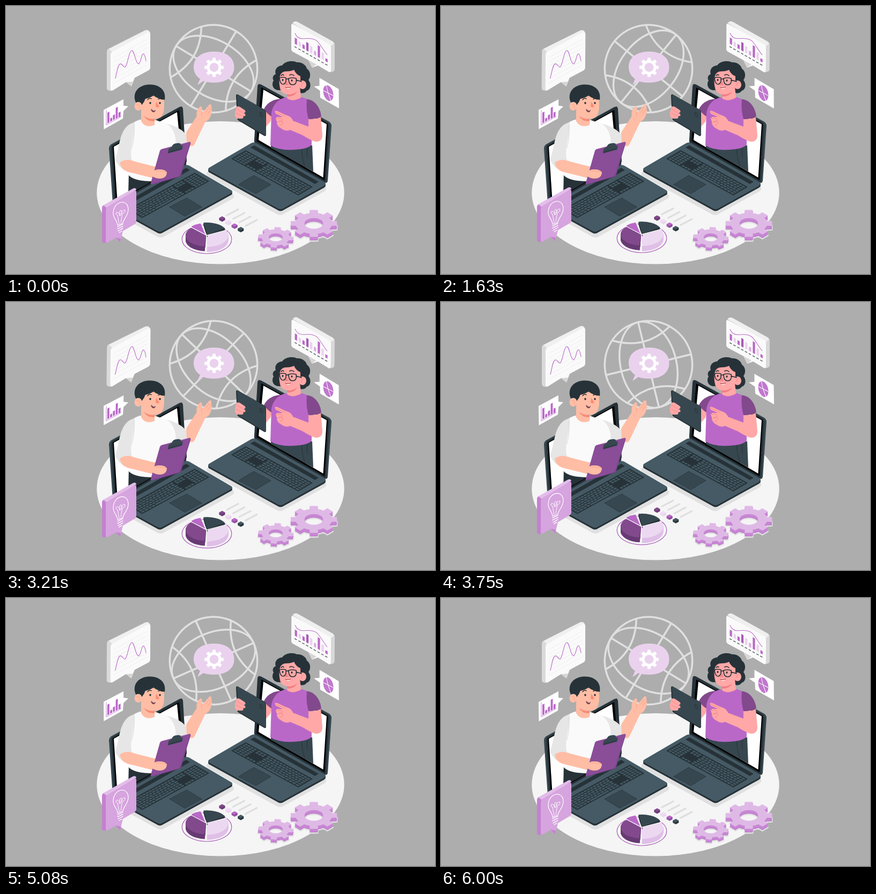
An HTML page with a canvas that plays this animation: 800 by 500 pixels, repeating every 6040 ms.

```html
<!DOCTYPE html>
<html lang="en">
<head>
<meta charset="utf-8">
<title>Online meeting</title>
<style>
html, body { margin: 0; width: 100%; height: 100%; overflow: hidden; background: #adadad; }
canvas { display: block; width: 800px; height: 500px; }
</style>
</head>
<body>
<canvas id="stage" width="800" height="500"></canvas>
<script>
const LOOP = 6040, SPIN = 6000, BOB = SPIN / 4, TAU = Math.PI * 2;
const INK = '#263238', SLATE = '#37474f', STEEL = '#455a64', GREY = '#e0e0e0', PAPER = '#fafafa';
const PURPLE = '#ba68c8', PLUM = '#8a4d98', SHADE = '#82498c', DEEP = '#683a74', LILAC = '#ead2ee', PINK = '#d6a4de';
const SKIN_M = '#ffbda5', SKIN_W = '#ffa8a7';

const stage = document.getElementById('stage').getContext('2d');
let g = stage;

const fill = (color, d) => { g.fillStyle = color; g.fill(new Path2D(d), 'evenodd'); };
const line = (color, w, d) => {
  g.strokeStyle = color; g.lineWidth = w; g.lineCap = g.lineJoin = 'round';
  g.stroke(new Path2D(d));
};
const oval = (color, x, y, rx, ry = rx, rot = 0) => {
  g.fillStyle = color; g.beginPath(); g.ellipse(x, y, rx, ry, rot, 0, TAU); g.fill();
};
const at = (x, y, draw) => { g.save(); g.translate(x, y); draw(); g.restore(); };
const layer = draw => {
  const c = document.createElement('canvas');
  c.width = 800; c.height = 500;
  g = c.getContext('2d'); draw(); g = stage;
  return c;
};

function gearPath(r, root, hole, squash, turn, teeth = 8) {
  let d = '';
  const p = (rad, a) => (rad * Math.cos(a)).toFixed(2) + ' ' + (rad * squash * Math.sin(a)).toFixed(2);
  for (let i = 0; i < teeth; i++) {
    const a = turn + i * TAU / teeth, s = TAU / teeth;
    [[root, -.28], [r, -.21], [r, .21], [root, .28]].forEach(([q, k], j) => {
      d += (i || j ? 'L' : 'M') + p(q, a + k * s);
    });
    d += 'Q' + p(root * 1.04, a + s / 2) + ' ' + p(root, a + .72 * s);
  }
  const h = hole * squash;
  return d + `ZM${hole} 0A${hole} ${h} 0 1 0 ${-hole} 0A${hole} ${h} 0 1 0 ${hole} 0Z`;
}

function floorGear(x, y, r, depth, turn) {
  const d = gearPath(r, r * .77, r * .41, .577, turn);
  at(x, y, () => {
    at(0, depth + 1, () => { fill(GREY, d); line(GREY, 3, d); });
    for (let i = depth; i > 0; i -= .5) at(0, i, () => fill(i > depth - 1 ? '#b873c6' : '#c787d3', d));
    fill('#dfb9e6', d);
    line('#e5c6eb', .6, d);
  });
}

/* ---------- laptops ---------- */
function keyboard() {
  g.save();
  g.transform(125, 68.5, -27, 16, 447, 269);
  g.fillStyle = INK; g.fillRect(0, 0, 1, 1);
  const keys = (u0, u1, cols, row) => {
    const w = (u1 - u0) / cols;
    for (let c = 0; c < cols; c++) {
      g.fillStyle = STEEL;
      g.fillRect(u0 + c * w + .005, .075 + row * .15, w - .01, .105);
    }
  };
  for (let r = 0; r < 6; r++) {
    keys(.012, .19, 4, r);
    if (r < 2) keys(.205, .335, 3, r);
    if (r < 5) keys(.35 + (r % 2) * .01, .988, 14 - (r % 3), r);
  }
  keys(.205, .335, 3, 5);
  keys(.35, .5, 3, 5); keys(.5, .78, 1, 5); keys(.78, .988, 4, 5);
  g.restore();
}

function laptop() {
  const base = 'M380 301L457 256Q462 253 467 256L593 328Q599 331 593 335L517 377Q512 380 507 377L380 307Q374 304 380 301Z';
  at(-1, 9, () => { fill(GREY, base); line(GREY, 5, base); });
  fill(SLATE, 'M475 146L603 216Q607 219 607 224L600 326Q599 332 594 329L470 258L474 150Z');
  fill(INK, 'M474 146L600 217Q603 219 603 224L597 326Q596 331 591 329L466 258Q462 255 463 249L469 150Q470 144 474 146Z');
  fill('#000', 'M476 152L600 220L594 325L467 252Z');
  fill('#fff', 'M480 156L598 220.5L591.5 320L471 250Z');
  for (const dy of [4, 2]) at(0, dy, () => fill(INK, base));
  fill(STEEL, base);
  line('#546a75', .7, 'M380 307L507 377Q512 380 517 377L593 335');
  fill(INK, 'M463 260L583 328L576 332L456 264Z');
  keyboard();
  fill(SLATE, 'M434 333L462 316L494 333L466 350Z');
  line(INK, .7, 'M434 333L462 316L494 333L466 350Z');
}

/* ---------- people ---------- */
function man() {
  fill(INK, 'M229 312L336 265L337 291L228 352Z');
  fill('#e6e6e6', 'M294 219C312 221 330 230 338 243L336 262L312 268L298 250Z');
  fill(SKIN_M, 'M336 236L358 202C364 198 376 205 373 213L352 257C349 264 342 262 337 256Z');
  fill(SKIN_M, 'M357 209C353 200 357 191 363 187Q367 187 365 198L368 197L379 184Q384 182 383 188L384 196C382 207 378 215 370 216Q361 218 357 209Z');
  line('#f29b87', .8, 'M365 198Q363 204 366 207M372 199L379 189M375 203L383 192');
  fill(PAPER, 'M250 212C236 216 228 224 226 238L229 316Q240 327 272 327L322 308L316 246C313 229 304 219 291 217L277 212Z');
  fill('#e6e6e6', 'M240 217C224 220 216 235 212 253L204 287Q210 303 222 304L236 291Q230 278 236 252Q240 231 240 217Z');
  line('#d2d2d2', .8, 'M239 222Q240 250 234 266');
  fill(SKIN_M, 'M212 292Q225 283 240 290L275 299C289 299 300 304 301 309Q301 318 293 321Q284 324 270 320L226 309Q214 305 212 292Z');
  fill(PLUM, 'M290 267L342 253.5Q345 253 344 256L327 314Q326 317 323 318L273 333Q269 334 270 330L287 270Q288 268 290 267Z');
  line('#75408a', 1, 'M271 333L324 318L344 256');
  fill(SLATE, 'M303 267L309 263Q311 256 319 256Q327 255 326 260L330 261L328 268L302 275Z');
  line(INK, 1.2, 'M303 273L328 266');
  fill(SKIN_M, 'M270 309L281 305Q296 304 300 310Q300 318 293 321Q283 324 273 318Z');
  line('#f29b87', .8, 'M279 307Q290 307 299 310');

  // neck and head
  fill(SKIN_M, 'M252 194L252 215Q260 229 277 222L278 204Z');
  fill('#f58e78', 'M257 205Q266 212 277 210L277 215Q263 216 257 205Z');
  fill(SKIN_M, 'M250 166L294 170C296 184 296 202 288 208Q278 213 265 207Q254 202 251 190Z');
  fill(INK, 'M242 180C234 160 249 147 267 146.5C287 146 299 158 296 175Q284 174 275 167Q268 172 260 173Q258 179 253 185Q251 178 246 180Z');
  oval(SKIN_M, 246.5, 187, 7, 8);
  line('#f29b87', .8, 'M245 184Q249 184 249 190');
  line(INK, 1.5, 'M264 175Q267 171 271 173M284 174Q288 171 291 174');
  oval(INK, 269, 181, 1.7, 2); oval(INK, 287, 181, 1.7, 2);
  fill('#ff8b72', 'M280 178L286 188Q283 190 279 188Z');
  fill('#7b3f4c', 'M270 192Q275 195 279 194Q278 199 274 198Q271 197 270 192Z');
  fill('#fff', 'M271 193Q275 195 278 194.5Q276 197 271 193Z');
}

function woman() {
  fill(SLATE, 'M494 254L571 260L573 309L494 265Z');
  line(INK, 1, 'M551 267Q552 283 557 299M562 265Q560 274 562 282');
  fill(SKIN_W, 'M482 190L499 198L493 216L483 227Z');
  fill(SHADE, 'M516 173C500 173 488 179 481 192Q488 203 497 207L512 186Z');
  fill(PURPLE, 'M524 170C507 173 498 184 495 198L493 260Q512 272 550 267Q566 264 570 259L570 205L566 175L548 169Z');
  fill(SHADE, 'M561 174C574 174 586 188 588 206Q578 212 564 211Q559 193 561 174Z');
  fill(SKIN_W, 'M564 211Q578 212 587 207L590 241Q590 254 577 253Q569 251 553 241L527 230L532 213L564 225Z');
  fill(SKIN_W, 'M502 199Q500 194 506 196L521 203Q534 206 536 217Q537 227 530 231Q523 235 514 229Q504 224 505 215L503 211Q504 206 509 207L516 207L503 201Z');
  line('#f17f80', .8, 'M504 211Q512 207 515 211Q517 215 509 216M506 217Q513 213 516 217Q516 222 510 223M503 198L520 206');

  // tablet
  fill(INK, 'M432 165L482 193Q485 195 485 198L485 240Q485 244 481 242L434 214Q431 212 431 208L429 168Q429 164 432 165Z');
  fill(SLATE, 'M434 166L481 193Q484 195 484 198L485 238Q485 242 481 240L436 213Q433 211 433 208L431 169Q431 165 434 166Z');
  line(INK, 1, 'M474 198L478 200L478 207L474 205Z');
  fill(SKIN_W, 'M430 188Q434 186 439 190L445 194Q449 198 443 200Q448 201 446 205L442 206Q444 209 440 210L431 210Q426 207 427 199Z');
  line('#f17f80', .8, 'M431 193L441 199M429 200L441 205');

  // hair, neck, head
  fill(INK, 'M503 127C500 118 507 111 515 111C520 103 534 101 542 105C551 104 560 110 561 117C568 121 569 132 564 138C570 146 568 156 561 158C557 164 549 164 545 159L508 157C499 157 494 147 499 139C496 134 498 129 503 127Z');
  fill(SKIN_W, 'M524 158L524 172Q534 180 550 171L548 150Z');
  fill('#f17f80', 'M524 164Q535 166 543 159Q539 169 524 169Z');
  fill(SKIN_W, 'M511 130Q514 122 522 122Q532 122 537 119Q541 128 549 131L549 151Q543 164 528 165Q513 165 511 153Q508 141 511 130Z');
  oval(SKIN_W, 553, 147, 7, 8);
  line('#f17f80', .8, 'M551 149Q551 143 556 144');
  line(INK, 1.6, 'M513 130Q515 127 518 129M529 129Q533 126 537 130');
  oval(INK, 516, 138, 1.5, 2); oval(INK, 533, 139, 1.5, 2);
  fill('#f9868a', 'M523 137L520 147Q523 149 527 147Z');
  line(INK, 1.6, 'M510 134Q516 132 522 134Q523 145 517 146Q511 146 510 134ZM527 135Q534 133 541 135Q543 147 534 147Q527 147 527 135ZM522 137Q525 135 527 137M541 138L551 141');
  line('#8c3344', 1, 'M521 152Q526 154 531 151');
  fill('#fff', 'M522 153Q527 154 530 152Q527 157 522 153Z');
}

/* ---------- floating cards ---------- */
function lineCard() {
  fill('#f0f0f0', 'M191 80L259 45.5Q266 43 268 49L196 87Z');
  fill('#dadada', 'M188 86Q188 81 191 80L197 85L197 158Q188 159 188 153Z');
  fill(PAPER, 'M195 91Q195 87 199 85L264 49Q269 47 269 52L269 115Q269 118 266 120L240 134L234 150L224 142L200 157Q195 160 195 154Z');
  fill('#d6d6d6', 'M224 142L234 150L237 141Z');
  for (let i = 0; i < 7; i++) line('#ececec', .8, `M201 ${96 + i * 8}L263 ${62 + i * 8}`);
  line(PURPLE, 1.1, 'M204 135C207 122 209 109 213 108C217 107 219 115 222 114C227 111 229 84 234 83C240 82 241 107 247 108C252 107 252 90 256 89C259 89 260 97 261 102');
}

function barCard() {
  fill('#d8d8d8', 'M536 31Q539 27 544 30L609 66Q613 68 613 73L613 117Q613 123 606 123L600 80Z');
  fill('#efefef', 'M534 32Q538 27 544 30L609 66L612 70L605 75Z');
  fill(PAPER, 'M532 36Q532 32 536 34L602 71Q606 73 606 77L606 120Q606 125 602 123L582 111L571 115L564 101L536 86Q532 84 532 80Z');
  fill('#d6d6d6', 'M564 101L571 115L579 109Z');
  const tops = [59, 66, 71, 67, 74, 83, 73, 86, 97];
  const tint = [PURPLE, LILAC, PURPLE, '#a65bb5', LILAC, '#d9aee1', PURPLE, LILAC, PURPLE];
  tops.forEach((y, i) => {
    const x = 538.5 + i * 7.15, b = 70.5 + i * 4.05;
    fill(tint[i], `M${x} ${y}l4.2 2.4L${x + 4.2} ${b + 2.4}L${x} ${b}Z`);
    line(INK, 1.1, `M${x} ${b + 5.5}l3.4 1.9`);
  });
  line(PURPLE, 1, 'M539 51C542 59 548 61 554 61C562 61 566 59 574 62C584 65 588 78 599 91');
}

function smallBars() {
  fill('#fff', 'M182 194L219 174L219 186L228 187L219 196L218 210L182.5 230Z');
  line(PURPLE, .8, 'M187 195L187 222L215 206');
  [[198, 217], [209, 214], [203, 211], [189, 208.5], [198, 206]].forEach(([top, b], i) => {
    const x = 189 + i * 5.2;
    fill(PURPLE, `M${x} ${top + 1}l3.8 -2L${x + 3.8} ${b}L${x} ${b + 2}Z`);
  });
}

function pieCard() {
  fill('#fff', 'M584.5 134L620.5 155L621 191L586 171L585.5 158L574 150L584.5 149Z');
  oval('#c078ce', 601, 162.5, 9, 15, -.28);
  line('#fff', 1, 'M597 147L600.5 162L610 167M600.5 162L606 177M600.5 162L592 158');
}

function bulbCard() {
  fill('#e3bdea', 'M181 372L236 341Q242 338 243 343L188 378Z');
  fill('#c481d0', 'M179 377Q179 373 182 372L188 377L188 441Q179 444 179 438Z');
  fill(PINK, 'M186 380Q186 377 189 375L239 345Q243 343 243 347L243 402Q243 405 240 407L218 420L213 441L204 433L190 441Q186 443 186 438Z');
  fill('#c481d0', 'M204 432L213 441L214 434Z');
  line('#fff', 1.2, 'M208 409C208 400 200 397 200 387C200 375 207 367 216 366C224 366 228 372 228 380C228 391 219 397 218 405Z');
  line('#fff', 1, 'M211 406L208 390Q203 389 206 385Q211 384 212 391Q214 392 215 387Q217 379 222 381Q222 386 217 387L214 404M212 391Q211 382 214 381Q217 383 215 387');
  line('#fff', 1.4, 'M208 412L218 407M208 416L218 411M209 420L218 415M211 423L216 420');
}

function pieChart() {
  g.strokeStyle = '#a959b8'; g.lineWidth = 1.2;
  g.beginPath(); g.ellipse(374.5, 435, 46.3, 27, 0, 0, TAU); g.stroke();
  const slice = (x, y, a, b, top, side, depth, rx, ry) => {
    const shape = dy => {
      g.beginPath(); g.moveTo(x, y + dy);
      g.ellipse(x, y + dy, rx, ry, 0, a, b); g.closePath(); g.fill();
    };
    g.fillStyle = side;
    for (let i = depth; i > 0; i -= .5) shape(i);
    g.fillStyle = top; shape(0);
  };
  slice(375, 426.500, -1.74, -.55, SLATE, INK, 5, 39, 22.5);
  slice(372, 427, -2.32, -1.82, PURPLE, '#9a52a8', 5, 38, 22);
  slice(373, 428, 1.64, 3.88, SHADE, DEEP, 9, 38, 20.5);
  slice(376, 428, -.45, 1.6, '#ecd9f1', '#dfbfe7', 9.5, 38.5, 21.5);
  line('#f5f5f5', 1.4, 'M346 413L374 428L412 418M364 405L374 428L372.5 449');
  [[SHADE, DEEP], ['#f0dff4', LILAC], [PURPLE, PLUM], [STEEL, INK]].forEach(([top, side], i) => {
    at(403 + i * 11.6, 397.5 + i * 6.6, () => {
      fill(side, 'M-5.5 -2L0 -5L5.500 -2L5.5 2L0 5L-5.5 2Z');
      fill(top, 'M-5.5 -2L0 -5L5.5 -2L0 1Z');
      g.globalAlpha = .4; fill(top, 'M-5.5 -2L0 1L0 5L-5.5 2Z'); g.globalAlpha = 1;
      line('#dedede', 3.2, 'M9 -7L30 -18');
    });
  });
}

/* ---------- globe ---------- */
function globe(angle) {
  at(387, 117, () => {
    g.rotate(angle);
    g.strokeStyle = GREY; g.lineWidth = 3.5;
    for (const rx of [81.7, 52]) { g.beginPath(); g.ellipse(0, 0, rx, 81.7, 0, 0, TAU); g.stroke(); }
    line(GREY, 3.5, 'M0 -81L0 81M-81 0L81 0M-55 -60Q0 -28 55 -60M-55 60Q0 28 55 60');
  });
}

function speech() {
  fill(LILAC, 'M388 85C412 85 425.5 97 425.5 114C425.5 132 411 143 388 143Q376 143 368 140L357 147.5L362 136C354 131 350 123 350 114C350 97 364 85 388 85Z');
  at(388, 114.5, () => fill('#fff', gearPath(18, 13.5, 8.5, 1, 0)));
}

const floor = layer(() => {
  g.fillStyle = '#adadad'; g.fillRect(0, 0, 800, 500);
  oval('#f5f5f5', 400, 348.3, 230.7, 133.3);
});
const scene = layer(() => {
  speech();
  laptop();
  g.save(); g.transform(-1, 0, 0, 1, 799, 42); laptop(); g.restore();
  man();
  woman();
  floorGear(503, 431.5, 33, 6, .12);
  floorGear(574, 405.5, 43.5, 7, 0);
});

const sway = [[lineCard, 228, 101], [barCard, 572.5, 76], [smallBars, 205, 202], [pieCard, 598, 162.5]];
const start = performance.now();

function frame() {
  const t = (performance.now() - start) % LOOP;
  const p = (t / BOB + .02) % 1;
  const rise = -10 * (1 - Math.abs(1 - 2 * p));
  const tilt = p < .25 ? p * 4 : p < .75 ? 2 - p * 4 : p * 4 - 4;

  g.drawImage(floor, 0, 0);
  globe((-58.8 + 360 * t / SPIN) * Math.PI / 180);
  g.drawImage(scene, 0, 0);
  for (const [card, x, y] of sway) {
    at(x, y, () => { g.rotate(tilt * Math.PI / 180); g.translate(-x, -y); card(); });
  }
  at(0, rise + .4, () => { pieChart(); bulbCard(); });
  requestAnimationFrame(frame);
}
frame();
</script>
</body>
</html>
```
